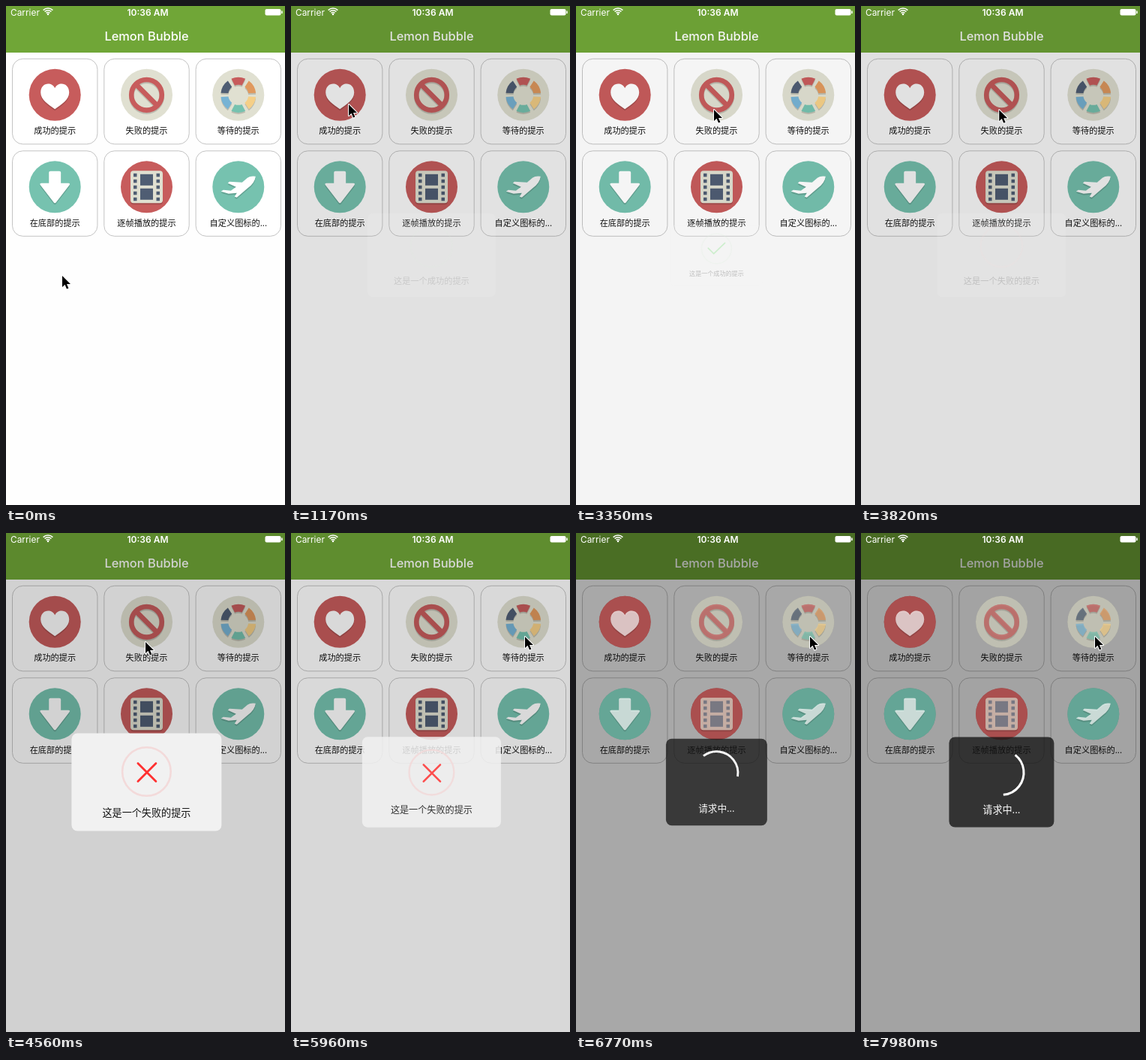
Animation, 372 px wide and 664 px high, one loop 8000 ms. Source, as an HTML page with a canvas:

```html
<!DOCTYPE html>
<html lang="zh">
<head>
<meta charset="utf-8">
<title>Lemon Bubble</title>
<style>
  html, body { margin: 0; width: 100%; height: 100%; overflow: hidden; background: #fff; }
  canvas { display: block; }
</style>
</head>
<body>
<canvas id="stage" width="372" height="664"></canvas>
<script>
const ctx = document.getElementById('stage').getContext('2d');
const LOOP = 8000, TAU = Math.PI * 2;
const LATIN = 'Inter, "Noto Sans", sans-serif';
const CJK = '"Noto Sans CJK SC", "Noto Sans CJK", "Noto Sans", sans-serif';
const RED = '#c75c5c', TEAL = '#76c2af', CREAM = '#e0e0d1', NAVY = '#4f5d73';

const clamp = v => Math.max(0, Math.min(1, v));
const smooth = v => { v = clamp(v); return v * v * (3 - 2 * v); };

function text(str, x, y, font, color, align = 'center') {
  ctx.font = font;
  ctx.fillStyle = color;
  ctx.textAlign = align;
  ctx.textBaseline = 'alphabetic';
  ctx.fillText(str, x, y);
}
function disc(x, y, r, color) {
  ctx.fillStyle = color;
  ctx.beginPath();
  ctx.arc(x, y, r, 0, TAU);
  ctx.fill();
}
function roundRect(x, y, w, h, r) {
  ctx.beginPath();
  ctx.roundRect(x, y, w, h, r);
}
function fillPath(d, color) {
  ctx.fillStyle = color;
  ctx.fill(new Path2D(d));
}
function stroke(color, width, cap = 'butt') {
  ctx.strokeStyle = color;
  ctx.lineWidth = width;
  ctx.lineCap = cap;
  ctx.stroke();
}

// Card glyphs, drawn around the centre of their disc
function heart() {
  fillPath('M0-9C-4-18-19-17-19-3C-19 7-8 13 0 19C8 13 19 7 19-3C19-17 4-18 0-9Z', '#fff');
}
function forbidden() {
  ctx.beginPath();
  ctx.arc(0, 0, 20.3, 0, TAU);
  ctx.moveTo(-14, -14);
  ctx.lineTo(14, 14);
  stroke(RED, 6.6);
}
function wheel() {
  [RED, '#e0995e', '#f5cf87', TEAL, '#77b3d4', NAVY].forEach((color, i) => {
    const mid = -Math.PI / 2 + i * TAU / 6;
    ctx.fillStyle = color;
    ctx.beginPath();
    ctx.arc(0, 0, 23.5, mid - 0.41, mid + 0.41);
    ctx.arc(0, 0, 13.5, mid + 0.36, mid - 0.36, true);
    ctx.closePath();
    ctx.fill();
  });
}
function arrow() {
  fillPath('M-6-21H6Q8-21 8-19V-5H18Q21-5 19-2L2 20Q0 23-2 20L-19-2Q-21-5-18-5H-8V-19Q-8-21-6-21Z', '#fff');
}
function film() {
  ctx.fillStyle = CREAM;
  roundRect(-21.5, -21.5, 43, 43, 4);
  ctx.fill();
  ctx.shadowColor = 'transparent';
  ctx.fillStyle = NAVY;
  ctx.fillRect(-8.5, -17, 17, 15);
  ctx.fillRect(-8.5, 2, 17, 15);
  for (let i = 0; i < 5; i++) {
    ctx.fillRect(-17.5, -18 + i * 8, 4.5, 4.5);
    ctx.fillRect(13, -18 + i * 8, 4.5, 4.5);
  }
}
function plane() {
  fillPath('M23-14Q16-15 12-12L5-6-12-7-14-5-3 0-10 5-20 4-23 6-13 9-2 8-5 13-2 14 12 2Q22-5 23-14Z', '#fff');
}

const cards = [
  ['成功的提示', RED, heart], ['失败的提示', CREAM, forbidden], ['等待的提示', CREAM, wheel],
  ['在底部的提示', TEAL, arrow], ['逐帧播放的提示', RED, film], ['自定义图标的...', TEAL, plane]
].map(([label, color, glyph], i) => (
  { label, color, glyph, x: 65.2 + (i % 3) * 122.3, y: i < 3 ? 118.3 : 240.8 }));

function icon({ x, y, color, glyph }) {
  disc(x, y, 34.5, color);
  ctx.save();
  ctx.translate(x, y);
  ctx.shadowColor = 'rgba(0,0,0,.16)';
  ctx.shadowOffsetY = 2;
  glyph();
  ctx.restore();
}

function page() {
  ctx.fillStyle = '#fefefe';
  ctx.fillRect(0, 0, 372, 664);
  ctx.fillStyle = '#70a637';
  ctx.fillRect(0, 0, 372, 62);
  text('Lemon Bubble', 187.5, 46, '500 16.4px ' + LATIN, '#fff');
  for (const card of cards) {
    roundRect(card.x - 56.7, card.y - 48, 113.4, 113.5, 14);
    ctx.fillStyle = '#fff';
    ctx.fill();
    stroke('#c4c4c4', 1);
    icon(card);
    text(card.label, card.x, card.y + 51.8, '11.2px ' + CJK, '#111');
  }
}

function statusBar() {
  text('Carrier', 6, 12.5, '11.9px ' + LATIN, '#fff', 'left');
  text('10:36 AM', 189, 12.5, '600 12px ' + LATIN, '#fff');
  for (const r of [3.5, 6.3, 9]) {
    ctx.beginPath();
    ctx.arc(56, 12, r, -Math.PI * 0.75, -Math.PI * 0.25);
    stroke('#fff', 1.5);
  }
  disc(56, 11, 1.3, '#fff');
  roundRect(345.5, 4, 21, 8.5, 2);
  ctx.fillStyle = '#fff';
  ctx.fill();
  ctx.fillRect(367.2, 6.5, 1.5, 3.5);
}

// Bubble icons; p is how much of the strokes is drawn
function trace(points, p) {
  const lengths = points.slice(1).map((q, i) => Math.hypot(q[0] - points[i][0], q[1] - points[i][1]));
  let left = p * lengths.reduce((a, b) => a + b);
  if (left <= 0) return;
  ctx.moveTo(...points[0]);
  lengths.forEach((len, i) => {
    const k = clamp(left / len), [x, y] = points[i], [nx, ny] = points[i + 1];
    if (k > 0) ctx.lineTo(x + (nx - x) * k, y + (ny - y) * k);
    left -= len;
  });
}
function ring(color) {
  ctx.beginPath();
  ctx.arc(0, -14, 32.3, 0, TAU);
  stroke(color, 2.6);
  ctx.beginPath();
}
function tick(p) {
  ring('#dcefdc');
  trace([[-18, -15], [-6, -3], [18, -26]], p);
  stroke('#4fdc50', 2.8, 'round');
}
function cross(p) {
  ring('#f3dada');
  trace([[-11.5, -25], [12.5, -1]], p * 2);
  trace([[12.5, -25], [-11.5, -1]], p * 2 - 1);
  stroke('#ff3030', 2.8, 'round');
}
function spinner(p, t) {
  const end = (85 / 360 + (t - 7980) / 1000) * TAU;
  ctx.beginPath();
  ctx.arc(0, -12.7, 29.6, end - 2.4, end);
  stroke('#fff', 3);
}

const bubbles = [
  { show: 1075, hide: 3225, label: '这是一个成功的提示', draw: tick },
  { show: 3715, hide: 5930, label: '这是一个失败的提示', draw: cross },
  { show: 6490, hide: Infinity, label: '请求中...', draw: spinner, dark: true }
];

function bubble(b, t) {
  const age = t - b.show, gone = smooth((t - b.hide) / 215 + 0.1 * (t > b.hide));
  if (age < 0 || gone >= 1) return;
  const mask = (1 - Math.exp(-age / 95)) * (1 - gone);
  ctx.fillStyle = `rgba(0,0,0,${(b.dark ? 0.36 : 0.176) * mask})`;
  ctx.fillRect(0, 0, 372, 664);
  const alpha = smooth((age - 35) / 280) * (1 - gone);
  if (b.dark) {
    // icons stay lighter than the dimmed page
    ctx.globalAlpha = 0.6 * alpha;
    cards.forEach(icon);
  }
  const [w, h] = b.dark ? [140, 120] : [200, 130];
  const scale = (0.83 + 0.17 * smooth(age / 400)) * (1 - 0.5 * gone);
  ctx.save();
  ctx.globalAlpha = alpha;
  ctx.translate(187.4, 331.5);
  ctx.scale(scale, scale);
  roundRect(-w / 2, -h / 2, w, h, 8);
  ctx.fillStyle = b.dark ? 'rgba(20,20,20,.78)' : '#f1f1f1';
  ctx.fill();
  b.draw(smooth((age - 250) / 470), t);
  text(b.label, 0, b.dark ? 41.5 : 45, '13.1px ' + CJK, b.dark ? '#fff' : '#111');
  ctx.restore();
  ctx.globalAlpha = 1;
}

// Pointer moves: start, end, control point, target
const moves = [
  [40, 800, 128, 255, 77, 131],
  [1250, 1700, 80, 133, 82, 137],
  [2010, 2520, 130, 151, 184, 147],
  [2760, 3150, 184, 143, 184, 138],
  [3740, 4300, 186, 140, 186, 145],
  [4840, 5540, 250, 142, 308, 141],
  [5650, 5780, 310, 140, 312, 138]
];
function pointer(t) {
  let x = 75, y = 359;
  for (const [start, end, cx, cy, tx, ty] of moves) {
    const k = smooth((t - start) / (end - start)), j = 1 - k;
    x = j * j * x + 2 * j * k * cx + k * k * tx;
    y = j * j * y + 2 * j * k * cy + k * k * ty;
    if (k < 1) break;
  }
  ctx.save();
  ctx.translate(x, y);
  const shape = new Path2D('M0 0V15L3.5 11.8 6 17.5 8.4 16.4 6 11H11Z');
  ctx.lineJoin = 'round';
  ctx.strokeStyle = '#fff';
  ctx.lineWidth = 2;
  ctx.stroke(shape);
  ctx.fillStyle = '#000';
  ctx.fill(shape);
  ctx.restore();
}

const began = performance.now();
function render() {
  const t = (performance.now() - began) % LOOP;
  page();
  for (const b of bubbles) bubble(b, t);
  statusBar();
  pointer(t);
  requestAnimationFrame(render);
}
render();
</script>
</body>
</html>
```
